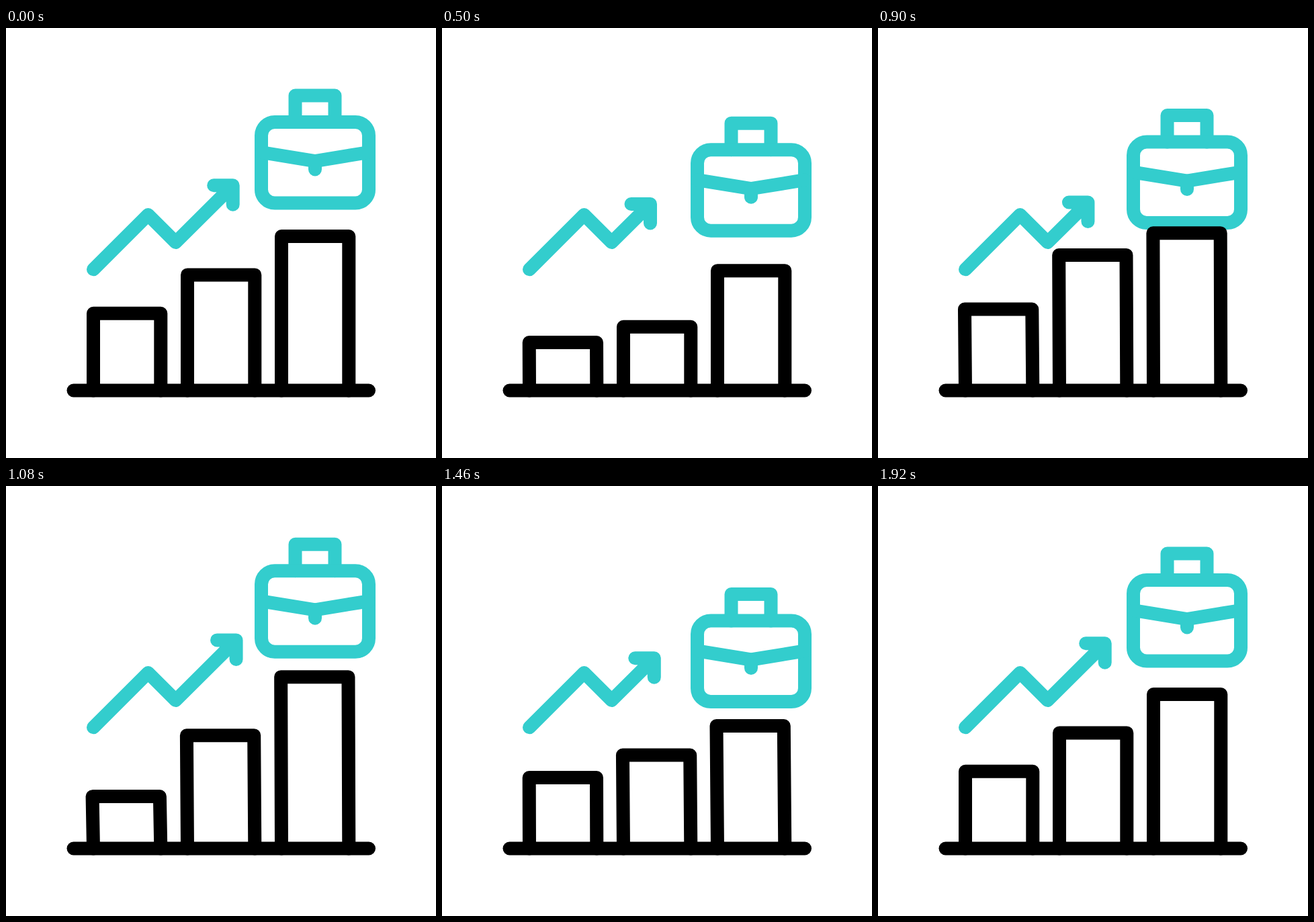
An HTML page that plays this animation: 640x640 px, repeating every 2.4 s.

```html
<!DOCTYPE html>
<html>
<head>
<meta charset="utf-8">
<style>
  html, body { margin: 0; height: 100%; overflow: hidden; background: #fff; }
  svg { display: block; width: 100vw; height: 100vh; }
  g { fill: none; stroke-width: 20; stroke-linecap: round; stroke-linejoin: round; }
</style>
</head>
<body>
<svg viewBox="0 0 640 640">
  <g stroke="#33cdcd">
    <path id="arrow"/>
    <g id="case">
      <path d="M430.5 140V100.5H489.5V140"/>
      <rect x="380" y="140" width="160" height="120.5" rx="20"/>
      <path d="M380 185L460 198L540 185" stroke-linejoin="miter"/>
      <path d="M460 198V210.5"/>
    </g>
  </g>
  <g stroke="#000">
    <path id="bars"/>
    <path d="M100.5 539.5H540"/>
  </g>
</svg>
<script>
const LOOP = 2400, STEP = 20, BAR_DELAY = 141;
const arrow = document.getElementById('arrow');
const briefcase = document.getElementById('case');
const bars = document.getElementById('bars');

const barTimes = [0, 358, 737, 1177, 1573];
const barDrop = [0, 77.3, -30, 47, 0];
const barLean = [0, 0, -0.8, -1.5, 0];
const caseTimes = [335, 690, 1065, 1480, 1915];
const caseDrop = [0, 92, -14, 61, 0];
const arrowTimes = [0, 760, 1190, 1555, 1915];
const arrowReach = [0, -38, 13.2, -29, 0];

// Eased value between keys, held before the first and after the last.
function at(t, times, values) {
  if (t <= times[0]) return values[0];
  const i = times.findIndex(k => k > t);
  if (i < 0) return values[values.length - 1];
  const x = (t - times[i - 1]) / (times[i] - times[i - 1]);
  return values[i - 1] + (values[i] - values[i - 1]) * x * x * (3 - 2 * x);
}

function bar(t, i) {
  const phase = t - i * BAR_DELAY;
  const left = 130 + i * 140;
  const x = left + at(phase, barTimes, barLean);
  const y = 424.7 - i * 57.3 + at(phase, barTimes, barDrop);
  return `M${left} 539.5L${x} ${y}h100.3L${left + 100.3} 539.5`;
}

function draw(now) {
  const t = Math.floor(now % LOOP / STEP) * STEP;
  const reach = at(t, arrowTimes, arrowReach);
  const x = 337.7 + reach, y = 234.3 - reach;
  arrow.setAttribute('d',
    `M130 359.3L211.5 278L252.5 319L${x} ${y}M${x - 28.5} ${y}H${x}V${y + 28.5}`);
  briefcase.setAttribute('transform', `translate(0 ${at(t, caseTimes, caseDrop)})`);
  bars.setAttribute('d', [0, 1, 2].map(i => bar(t, i)).join(''));
}

const start = performance.now();
function tick() {
  draw(performance.now() - start);
  requestAnimationFrame(tick);
}
tick();
</script>
</body>
</html>
```
